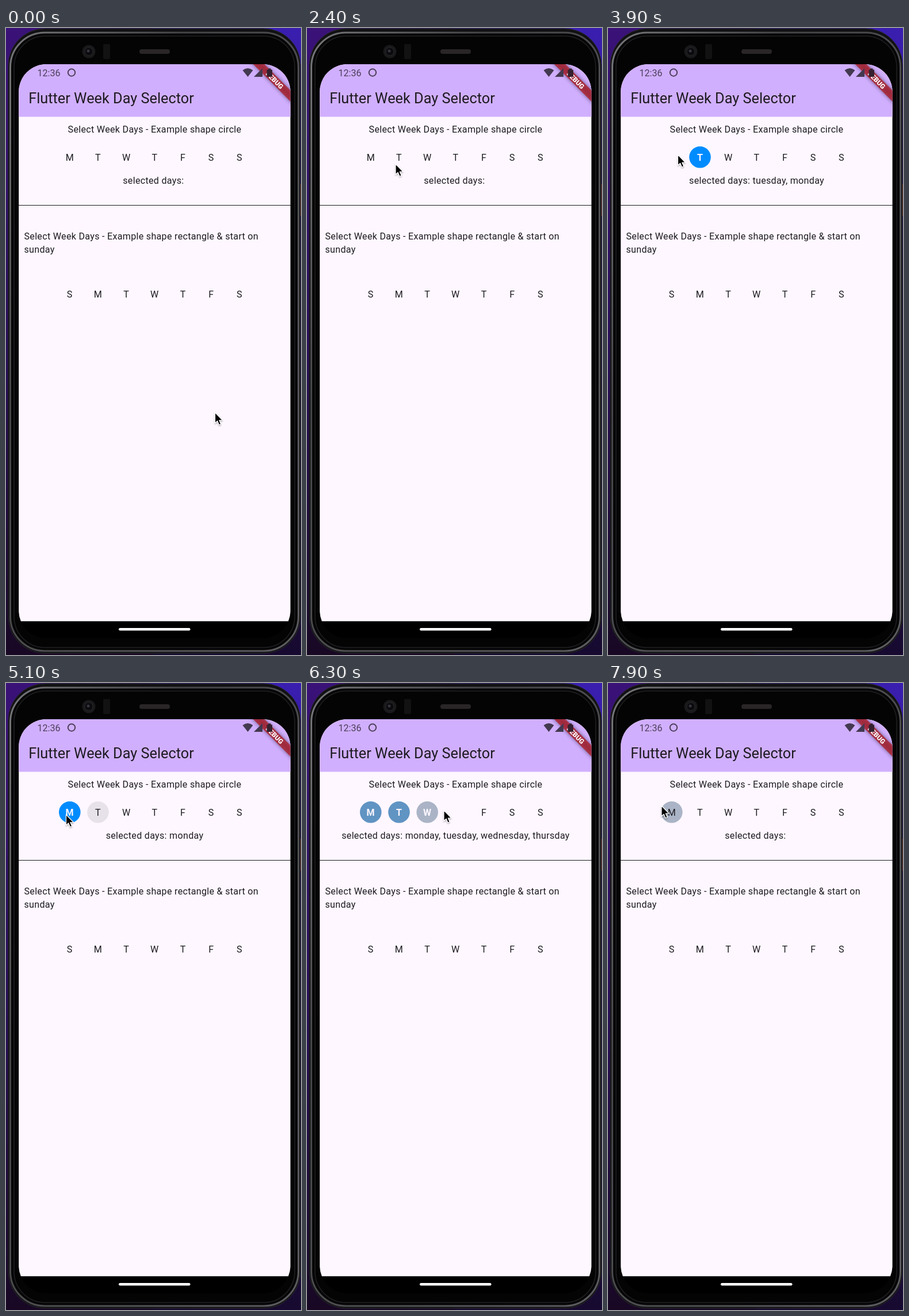
An HTML page that plays this animation: 513x1091 px, repeating every 8000 ms.

```html
<!DOCTYPE html>
<html lang="en">
<head>
<meta charset="utf-8">
<title>Week Day Selector</title>
<style>
  html, body { margin: 0; width: 100%; height: 100%; overflow: hidden; background: #1a0a38; }
  svg { display: block; width: 513px; height: 1091px; }
  text { font: 16.1px Roboto, sans-serif; letter-spacing: .29px; fill: #1d1b20; white-space: pre; }
  .mid { text-anchor: middle; }
  .title { font-size: 25.3px; letter-spacing: 0; }
  .clock { letter-spacing: 0; fill: #4a3f59; }
  .banner { font-size: 11.7px; font-weight: 900; letter-spacing: 0; fill: #fff; }
</style>
</head>
<body>
<svg viewBox="0 0 513 1091">
  <defs>
    <linearGradient id="wallLeft" x2="0" y2="1">
      <stop stop-color="#3a1278"/>
      <stop offset=".5" stop-color="#280d58"/>
      <stop offset="1" stop-color="#180824"/>
    </linearGradient>
    <linearGradient id="wallRight" x2="0" y2="1">
      <stop stop-color="#3a1eb0"/>
      <stop offset=".5" stop-color="#260f60"/>
      <stop offset="1" stop-color="#170a30"/>
    </linearGradient>
    <linearGradient id="rim" x2="1" y2="1">
      <stop stop-color="#77777a"/>
      <stop offset=".3" stop-color="#454548"/>
      <stop offset="1" stop-color="#5c5c60"/>
    </linearGradient>
    <clipPath id="screen"><rect x="22.200" y="63" width="472.400" height="999" rx="48"/></clipPath>
    <filter id="soft" x="-30%" y="-100%" width="160%" height="300%"><feGaussianBlur stdDeviation="3.500"/></filter>
    <filter id="drop" x="-50%" y="-50%" width="200%" height="200%">
      <feDropShadow dx="0" dy="1.5" stdDeviation="1.2" flood-opacity=".35"/>
    </filter>
  </defs>

  <!-- Phone body -->
  <rect width="257" height="1091" fill="url(#wallLeft)"/>
  <rect x="256" width="257" height="1091" fill="url(#wallRight)"/>
  <rect x="511" y="271" width="2" height="56" fill="#b94f43"/>
  <rect x="4" y="1" width="508" height="1087" rx="64" fill="#111113" stroke="#29292c"/>
  <rect x="7.500" y="8" width="501" height="1076" rx="60" fill="#060607" stroke="url(#rim)" stroke-width="3"/>
  <rect x="14" y="14" width="488" height="1064" rx="54" fill="#040405" stroke="#202023" stroke-width="1.500"/>
  <circle cx="144" cy="41" r="11.5" fill="#19191b"/>
  <circle cx="144" cy="41" r="7" fill="#0b0b0e" stroke="#29292d"/>
  <circle cx="143" cy="40" r="2.5" fill="#353541"/>
  <rect x="169" y="28" width="12" height="26" rx="2" fill="#121213"/>
  <rect x="232" y="37" width="53" height="8" rx="4" fill="#2a2627"/>

  <!-- App -->
  <g clip-path="url(#screen)">
    <rect x="22" y="63" width="473" height="969.500" fill="#fef7ff"/>
    <rect x="22" y="63" width="473" height="91.5" fill="#d1afff"/>
    <rect x="22" y="1032.500" width="473" height="30"/>
    <g transform="translate(467.2 90.6) rotate(45)">
      <rect x="-60" y="-6.900" width="120" height="13.800" opacity=".5" filter="url(#soft)"/>
      <rect x="-60" y="-6.900" width="120" height="13.800" fill="#b01a25" opacity=".75"/>
      <text class="banner mid" y="4.2">DEBUG</text>
    </g>
  </g>
  <rect x="196" y="1044" width="124.500" height="4.600" rx="2.300" fill="#fff"/>

  <!-- Status bar -->
  <text class="clock" x="54.500" y="84">12:36</text>
  <circle cx="114" cy="77.500" r="6.200" fill="none" stroke="#4a3f59" stroke-width="2"/>
  <g fill="#433950">
    <path d="M411.500 73.500Q420.500 66.500 429.500 73.500L420.500 85Z"/>
    <path d="M431 85L446 70V85Z"/>
    <path fill="#35202f" d="M453.500 73.500Q453.500 72.500 454.500 72.500H456V70.500H460.500V72.500H462Q463 72.500 463 73.500V84Q463 85 462 85H454.500Q453.500 85 453.500 84Z"/>
  </g>

  <text class="title" x="39.200" y="131">Flutter Week Day Selector</text>
  <text class="mid" x="258.500" y="181.500">Select Week Days - Example shape circle</text>
  <g id="circleDays"></g>
  <text class="mid" id="summary" x="258.500" y="271"></text>
  <path d="M22 308.500H495" stroke="#1d1b20" stroke-width="1.200"/>
  <text x="31.500" y="367.500">Select Week Days - Example shape rectangle &amp; start on</text>
  <text x="31.500" y="390.500">sunday</text>
  <g id="plainDays"></g>

  <path id="cursor" d="M0 0V18.500L4.100 14.700L7 21.500L10.200 20.200L7.300 13.500H13Z"
        stroke="#fff" stroke-width="1.200" stroke-linejoin="round" filter="url(#drop)"/>
</svg>

<script>
const LOOP = 8000, STEP = 100, FADE = 330;
const DAYS = ['monday', 'tuesday', 'wednesday', 'thursday', 'friday', 'saturday', 'sunday'];
const [MON, TUE, WED, THU] = [0, 1, 2, 3];

// [time, day toggled]
const TOGGLES = [
  [3300, TUE], [3900, MON], [4800, TUE], [5300, MON],
  [6095, MON], [6095, TUE], [6190, WED], [6300, THU],
  [7300, THU], [7400, WED], [7500, TUE], [7680, MON]
];

// [time, x, y] of the pointer tip
const POINTER = [
  [0, 363.5, 669], [900, 363.5, 669], [2100, 157, 240], [2400, 154, 236.500],
  [3200, 160, 227], [3700, 158, 222], [3900, 121.500, 220.500], [4300, 102, 223],
  [4700, 165, 226], [4800, 156, 227], [5100, 104.500, 229], [5300, 102, 228],
  [5900, 88, 224], [6100, 150, 223], [6300, 238, 221.500], [6500, 266, 219],
  [7200, 259.500, 211], [7300, 250, 212], [7500, 160, 215], [7700, 112, 216], [7900, 93, 213.500]
];

const $ = id => document.getElementById(id);

function add(parent, tag, attributes) {
  const node = document.createElementNS('http://www.w3.org/2000/svg', tag);
  for (const name in attributes) node.setAttribute(name, attributes[name]);
  return parent.appendChild(node);
}

function addDay(parent, letter, i, y) {
  const x = 110.8 + i * 49.2;
  const disc = add(parent, 'circle', { cx: x, cy: y - 6.200, r: 18.8, fill: 'none' });
  const label = add(parent, 'text', { x, y, class: 'mid' });
  label.textContent = letter;
  return { disc, label };
}

const buttons = DAYS.map((day, i) => addDay($('circleDays'), day[0].toUpperCase(), i, 231));
[...'SMTWTFS'].forEach((letter, i) => addDay($('plainDays'), letter, i, 469));

function pointerAt(t) {
  const next = POINTER.findIndex(key => key[0] > t);
  if (next < 0) return POINTER.at(-1).slice(1);
  const [a, b] = [POINTER[next - 1], POINTER[next]];
  const k = (t - a[0]) / (b[0] - a[0]);
  return [1, 2].map(i => a[i] + (b[i] - a[i]) * k);
}

function draw(t) {
  const past = TOGGLES.filter(([time]) => time <= t);
  let selected = [];
  for (const [, day] of past)
    selected = selected.includes(day) ? selected.filter(d => d !== day) : [...selected, day];

  buttons.forEach(({ disc, label }, day) => {
    const on = selected.includes(day);
    const last = past.filter(toggle => toggle[1] === day).at(-1);
    const progress = last ? Math.min(1, (t - last[0]) / FADE) : 1;
    const k = on ? progress : 1 - progress;
    // Blend from transparent black to blue
    disc.setAttribute('fill', `rgba(0,${140 * k},${255 * k},${k})`);
    label.style.fill = on ? '#fef7ff' : '';
    label.style.fontWeight = on ? 700 : 400;
  });

  $('summary').textContent = 'selected days: ' + selected.map(day => DAYS[day]).join(', ');
  $('cursor').setAttribute('transform', `translate(${pointerAt(t)})`);
}

const start = performance.now();
function tick() {
  const t = (performance.now() - start) % LOOP;
  draw(Math.floor(t / STEP) * STEP);
  requestAnimationFrame(tick);
}
tick();
</script>
</body>
</html>
```
